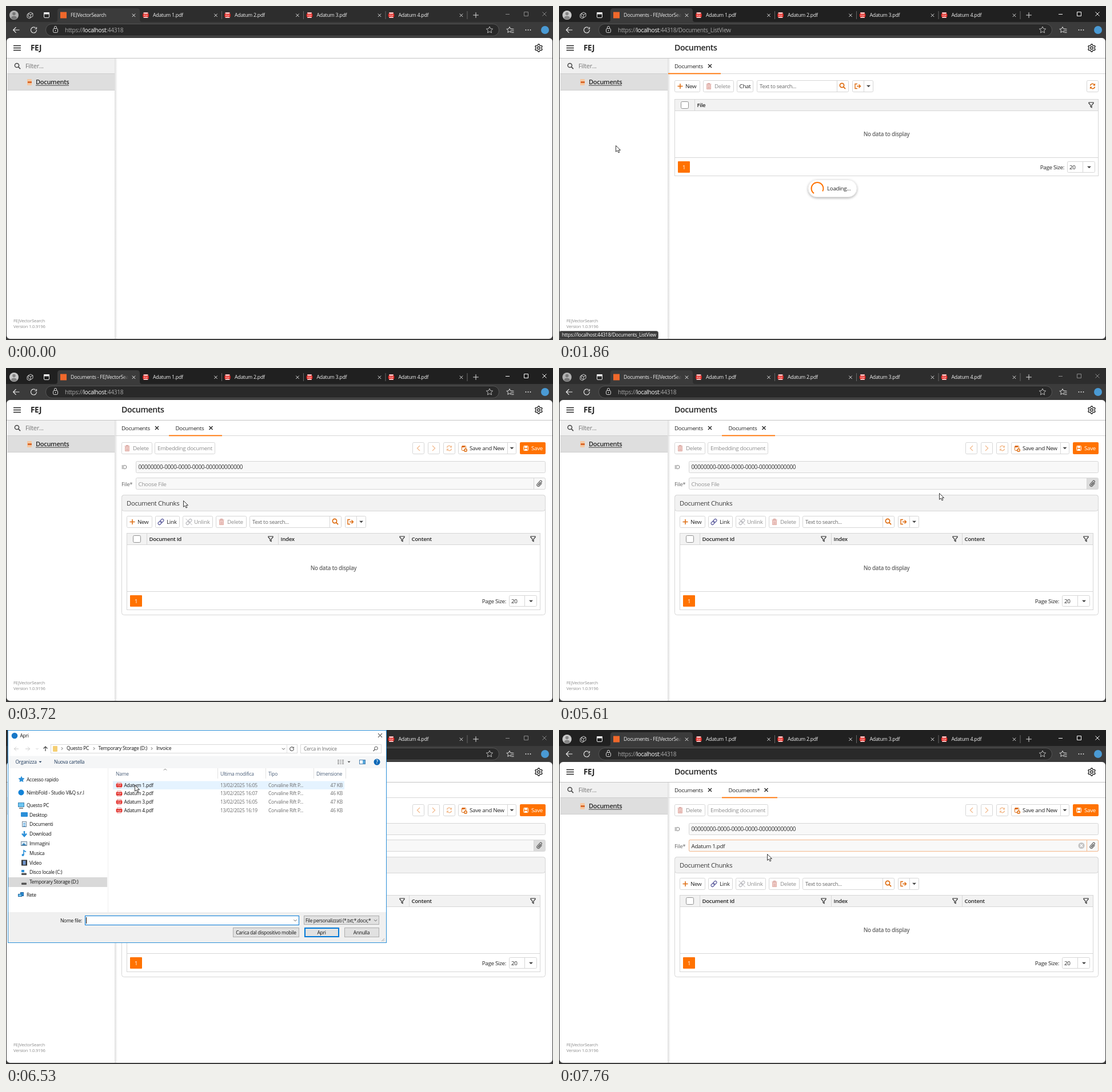
Recreate the animation shown at these times as an HTML page. Size 957x585 px, loop 8 s.

```html
<!DOCTYPE html>
<html lang="en">
<head>
<meta charset="utf-8">
<title>Document upload</title>
<style>
html, body { margin: 0; width: 100%; height: 100%; overflow: hidden; background: #3b3b3b; }
svg { display: block; }
text { font-family: "Open Sans", "Noto Sans", sans-serif; letter-spacing: -.03em; white-space: pre; }
.b { font-weight: 600; }
.brand { font-weight: 700; font-stretch: 75%; }
.end { text-anchor: end; }
.mid { text-anchor: middle; }
</style>
</head>
<body>
<svg id="stage" width="957" height="585" viewBox="0 0 957 585"></svg>
<script>
const ORANGE = '#ff7200', RUST = '#dd6a0c', INK = '#242424', LINE = '#d6d6d6', PALE = '#f2f2f2', OFF = '#8c8c8c', FADED = '#f3bd92';

// Drawing helpers
const T = (x, y, s, size = 9.8, fill = INK, cls = '') =>
  `<text x="${x}" y="${y}" font-size="${size}" fill="${fill}" class="${cls}">${s}</text>`;
const R = (x, y, w, h, fill = '#fff', rx = 0) =>
  `<rect x="${x}" y="${y}" width="${w}" height="${h}" fill="${fill}" rx="${rx}"/>`;
const box = (x, y, w, h, fill = '#fff', line = LINE, rx = 2) =>
  `<rect x="${x + .5}" y="${y + .5}" width="${w - 1}" height="${h - 1}" fill="${fill}" stroke="${line}" rx="${rx}"/>`;
const P = (d, c = INK, w = 1, fill = 'none') => `<path d="${d}" stroke="${c}" stroke-width="${w}" fill="${fill}"/>`;
const C = (x, y, r, fill, line = 'none', w = 1) =>
  `<circle cx="${x}" cy="${y}" r="${r}" fill="${fill}" stroke="${line}" stroke-width="${w}"/>`;
const G = (id, ...parts) => `<g id="${id}">${parts.join('')}</g>`;
const at = (x, y, s) => `<g transform="translate(${x} ${y})">${s}</g>`;

// Icons, centred on x, y
const plus = (x, y, c = RUST, r = 4.5, w = 1.5) => P(`M${x - r} ${y}h${2 * r}M${x} ${y - r}v${2 * r}`, c, w);
const cross = (x, y, r = 3, c = INK, w = 1.4) =>
  P(`M${x - r} ${y - r}l${2 * r} ${2 * r}m0 ${-2 * r}l${-2 * r} ${2 * r}`, c, w);
const caret = (x, y, c = '#444', r = 3.5) => P(`M${x - r} ${y - r / 2}h${2 * r}l${-r} ${r}z`, 'none', 0, c);
const chevron = (x, y, dx, dy, c, w = 1) => P(dx
  ? `M${x - dx} ${y - dy}l${2 * dx} ${dy}l${-2 * dx} ${dy}` : `M${x - dy} ${y - dy / 2}l${dy} ${dy}l${dy} ${-dy}`, c, w);
const glass = (x, y, c, w = 1.7, r = 3.6) => C(x - 1, y - 1, r, 'none', c, w) + P(`M${x + r - 2} ${y + r - 2}l3.5 3.5`, c, w);
const funnel = (x, y) => P(`M${x - 4} ${y - 4}h8v1.5l-3 3.2v4l-2 -1.2v-2.8l-3 -3.2z`, INK, 1.1);
const trash = (x, y) => P(`M${x - 4.5} ${y - 3.5}h9m-6 0v-1.5h3v1.5`, '#d59a93', 1.2) +
  P(`M${x - 3.5} ${y - 2}h7v7h-7z`, '#e0aaa3', 1, '#f3d5d0') + P(`M${x - 1} ${y}v4m2.2 0v-4`, '#cf8f88', .8);
const reload = (x, y, c, r = 4, w = 1.5) => at(x, y,
  P(`M${-r} -1A${r} ${r} 0 0 1 ${r - .5} -2M${r} 1A${r} ${r} 0 0 1 ${.5 - r} 2`, c, w) +
  P(`M${r + .6} -5v4h-4zM${-r - .6} 5v-4h4z`, 'none', 0, c));
const spinArrow = (x, y, r, c) => at(x, y, P(`M${r} 0A${r} ${r} 0 1 1 ${r * .65} ${-r * .75}`, c, 1.1) + P(`M${r} ${-r}v${r * .6}h${-r * .6}`, c, 1.1));
const exporter = (x, y) => P(`M${x - 1} ${y - 4}h-4v8h4M${x - 2} ${y}h6m-2.5 -3l3 3l-3 3`, RUST, 1.4);
const star = (x, y, r, c, fill = 'none') => P([...Array(10)].map((_, i) => {
  const a = Math.PI * (i / 5 - .5), q = i % 2 ? r * .48 : r;
  return (i ? 'L' : 'M') + (x + q * Math.cos(a)).toFixed(1) + ' ' + (y + q * Math.sin(a)).toFixed(1);
}).join('') + 'z', c, 1, fill);
const gear = (x, y) => P([...Array(24)].map((_, i) => {
  const a = Math.PI * (i - .5) / 12, r = i % 4 < 2 ? 6.6 : 4.9;
  return (i ? 'L' : 'M') + (x + r * Math.sin(a)).toFixed(1) + ' ' + (y - r * Math.cos(a)).toFixed(1);
}).join('') + 'z', INK, 1.4) + C(x, y, 2.2, 'none', INK, 1.4);
const pdf = (x, y) => R(x - 4, y - 5, 8, 10, '#fff', 1) + P(`M${x - 3.5} ${y - 4.5}h7v9h-7z`, '#d44', .6) +
  R(x - 5.3, y - 2.6, 10.6, 5.6, '#e0201b', 1) + T(x, y + 1.7, 'PDF', 4.2, '#fff', 'b mid');
const link = (x, y, c) => at(x, y, `<g transform="rotate(-45)" fill="none" stroke="${c}" stroke-width="1.1"><rect x="-6" y="-2.3" width="7" height="4.6" rx="2.3"/><rect x="-1" y="-2.3" width="7" height="4.6" rx="2.3"/></g>`);
const clip = (x, y) => at(x, y, `<g transform="rotate(42)">${P('M2.6 -3v6a2.6 2.6 0 0 1 -5.2 0v-7a1.8 1.8 0 0 1 3.6 0v6.5a.8 .8 0 0 1 -1.6 0v-5.5', '#444', 1)}</g>`);

// Web page controls
const button = (x, y, w, label, icon = '', c = INK, tx = x + 20) => box(x, y, w, 21) + icon + T(tx, y + 14, label, 9.8, c);
const search = (x, y) => box(x, y, 161, 21) + P(`M${x + 140.5} ${y}v21`, LINE) + T(x + 5, y + 14, 'Text to search...', 9.5, '#666') + glass(x + 150, y + 10, RUST);
const exports = (x, y) => box(x, y, 37, 21) + P(`M${x + 20.5} ${y}v21`, LINE) + exporter(x + 10, y + 10.5) + caret(x + 28.5, y + 10.5);
const newButton = (x, y) => button(x, y, 45, 'New', plus(x + 10, y + 10.5), INK, x + 19);
const deleteButton = (x, y) => button(x, y, 54, 'Delete', trash(x + 10, y + 10.5), OFF);
const grid = (x, y, w, cols) => {
  const r = x + w;
  return box(x, y, w, 135, '#fff', LINE, 0) + box(x, y, w, 21, PALE, LINE, 0) + box(x + 11, y + 4, 14, 13, '#fff', '#909090') +
    cols.map(([cx, name, fx]) => P(`M${cx + .5} ${y}v20`, LINE) + T(cx + 4.5, y + 14, name, 9.6, INK, 'b') + funnel(fx, y + 10)).join('') +
    T(573, y + 65, 'No data to display', 9.8, '#666', 'b mid') + P(`M${x} ${y + 102.5}h${w}`, LINE) +
    R(x + 6, y + 109, 21, 20, ORANGE, 1) + T(x + 16.5, y + 122.5, '1', 9.5, '#fff', 'mid') +
    T(r - 60, y + 122.5, 'Page Size:', 9.8, INK, 'end') + box(r - 55, y + 109, 49, 20) + P(`M${r - 27.5} ${y + 109}v20`, LINE) +
    T(r - 51, y + 122.5, '20') + caret(r - 16.5, y + 119.5);
};

// Browser window
const browser = () => {
  const tabs = [257, 400, 543.5, 686.5].map((x, i) => pdf(x - 12.5, 16) + T(x, 19, `Adatum ${i + 1}.pdf`, 8.8, '#f0f0f0') +
    cross(x + 110, 16.3, 2.7, '#ddd', 1) + P(`M${x + 120.5} 9v14`, '#666')).join('');
  return R(0, 0, 957, 585, '#3b3b3b') + '<rect id="strip" width="957" height="28"/>' +
    P('M86 28q4 0 4 -4v-15q0 -5 5 -5h134q5 0 5 5v15q0 4 4 4z', 'none', 0, '#3b3b3b') +
    G('person', C(14, 16, 8, '#c9c9c9'), C(14, 13.5, 2.8, '#858585'), P('M9 21.5q0 -4 5 -4t5 4q-5 4 -10 0z', 'none', 0, '#858585')) +
    P('M39 13l4 -2l4 2v5l-4 2.5l-4 -2.5zM39 13l-2 2v5l4 2l2 -1.5M39 13l4 2.3l4 -2.3M43 15.3v5', '#ddd', .9) +
    box(66, 11, 10, 10, 'none', '#f0f0f0', 1.5) + R(66, 11, 10, 3.5, '#f0f0f0', 1) + R(95, 10.5, 11, 11, '#f0682b') +
    '<svg x="113" y="6" width="101" height="18"><text id="title" y="13" font-size="8.8" fill="#f0f0f0"/></svg>' +
    R(204, 8, 10, 16, 'url(#fade)') + cross(223.5, 16.3, 2.7, '#eee', 1) + tabs + plus(822, 16, '#ddd', 4.8, 1) +
    `<g id="controls">${P('M874 14.5h7M906.5 10.5h7v7h-7zM938.5 10.5l7 7m0 -7l-7 7', 'currentColor', 1)}</g>` +
    P('M23.5 42h-11m5 -4.8l-4.8 4.8l4.8 4.8', '#eee', 1.2) + spinArrow(48.5, 42, 5, '#eee') +
    '<rect x="69.5" y="31.5" width="793" height="21" rx="10.5" fill="#292929" stroke="#555"/>' +
    box(82, 39, 9, 8, 'none', '#ddd') + P('M84.5 39v-1.5q0 -2 2 -2t2 2v1.5M86.5 42v2', '#ddd') +
    '<text id="url" x="103" y="45.5" font-size="10.2" fill="#a8a8a8"/>' +
    star(846, 42, 6, '#bbb') + star(881, 42, 5.5, '#ddd') + R(884, 41, 5, 6, '#3b3b3b') + P('M884.5 40.5h4m-4 3h4m-4 3h4', '#ddd') +
    [909.5, 913.5, 917.5].map(x => C(x, 42, .9, '#eee')).join('') + C(943, 42, 7, '#4a9ad4');
};

const page = () => R(1, 56, 955, 527, '#fff', 6) + P('M1 91.5h955', '#c4c4c4') +
  P('M13 69.5h13m-13 4h13m-13 4h13', INK, 1.6) + T(43, 78, 'FEJ', 13.5, INK, 'brand') + gear(932, 73.5) +
  R(190, 92, 5, 491, 'url(#shade)') + R(2, 92, 188, 27, '#f0f0f0') + R(2, 119, 188, 29, '#dedede') +
  P('M2 118.5h188M2 147.5h188', '#cfcfcf') + P('M190.5 92v491', '#e2e2e2') + glass(20, 105, '#444', 1.5) + T(34, 109, 'Filter...', 11, '#777') +
  R(37, 128, 8, 11, '#f6c7a0', 1) + R(38, 132, 7, 3, '#d9692b') + T(52, 137, 'Documents', 11.1, INK, 'b') + P('M52 139h58', INK, .9) +
  T(13, 553.5, 'FEJVectorSearch', 7.8, '#8d8d8d') + T(13, 564, 'Version 1.0.9196', 7.7, '#8d8d8d');

const heading = () => G('heading', T(202, 78, 'Documents', 14.2, INK, 'b'), P('M191 118.5h765', LINE), T(202, 109, 'Documents'), cross(264, 105));

const list = () => G('list', R(191, 117.5, 92, 1.8, ORANGE), newButton(202, 130), G('newHover', box(202, 130, 45, 21, '#ff720018', '#f0b98c')),
  deleteButton(252, 130), button(311, 130, 29, 'Chat', '', INK, 315.5), search(346, 130), exports(513, 130),
  box(923, 130, 21, 21), reload(933.5, 140.5, RUST), grid(202, 163, 742, [[237, 'File', 931]]));

const detail = () => G('detail', `<rect id="tabLine" x="285" y="117.5" height="1.8" fill="${ORANGE}"/>`,
  G('clean', T(296.5, 109, 'Documents'), cross(358.5, 105)), G('dirty', T(296.5, 109, 'Documents*'), cross(362.5, 105)),
  deleteButton(202, 130), button(260, 130, 106, 'Embedding document', '', OFF, 265),
  [711, 738, 765].map(x => box(x, 130, 21, 21)).join(''), P('M724 136l-4.5 4.5l4.5 4.5M746 136l4.5 4.5l-4.5 4.5', FADED, 1.4), reload(775.5, 140.5, FADED),
  button(791, 130, 102, 'Save and New', box(797, 136, 8, 9, '#fff', RUST, 1) + R(798, 136, 5, 3, RUST) + C(804, 144, 3, RUST) + plus(804, 144, '#fff', 2, 1)),
  P('M877.5 130v21', LINE), caret(885, 140.5), R(899, 130, 45, 21, ORANGE, 2), box(905, 136, 9, 9, 'none', '#fff', 1), R(907, 137, 5, 3, '#fff'), R(907, 141.5, 5, 3, '#fff'),
  T(919, 144, 'Save', 9.8, '#fff'), T(202, 177, 'ID', 9.8, '#666'), box(227, 163, 717, 21, '#f8f8f8'), T(231.5, 176.5, '00000000-0000-0000-0000-000000000000', 9.9, '#333'),
  T(202, 206.5, 'File*', 9.8, '#666'), box(227, 192, 717, 21, '#f8f8f8'), G('clipHover', R(923, 193, 20, 19, '#dcdcdc')),
  P('M923.5 192v21', LINE), clip(933.5, 202.5), G('choose', T(231.5, 206.5, 'Choose File', 9.8, '#949494')),
  G('focus', box(227, 192, 717, 21, 'none', '#f5b78a')),
  G('chosen', T(231.5, 206.5, 'Adatum 1.pdf'), box(227, 192, 717, 21, 'none', '#f5b78a'), P('M923.5 192v21', '#f5b78a'), C(914, 202.5, 5.5, '#c4c4c4'), cross(914, 202.5, 2.2, '#fff', 1.3)),
  G('progress', R(227, 210.5, 717, 2.5, ORANGE)),
  box(202, 222, 742, 211, '#fff', LINE, 4), box(202, 222, 742, 29, PALE, LINE, 4), T(211, 241, 'Document Chunks', 11.3, '#3c3c3c'),
  newButton(211, 259), button(261, 259, 43, 'Link', link(271, 269.5, '#56569a')), button(309, 259, 53, 'Unlink', link(320, 269.5, '#b8b8bd') + P('M314.5 264l11 11', '#b8b8bd'), OFF),
  deleteButton(367, 259), search(426, 259), exports(593, 259),
  grid(211, 289, 724, [[246, 'Document Id', 463], [476, 'Index', 693], [705, 'Content', 922]]));

const loading = () => G('loading', '<rect x="436" y="304.5" width="85" height="30" rx="15" fill="#fff" stroke="#ddd" stroke-width=".5" filter="url(#soft)"/>',
  `<circle id="ring" cx="452" cy="319.5" r="10.5" fill="none" stroke="${ORANGE}" stroke-width="2" stroke-dasharray="48 18"/>`, T(469, 323, 'Loading...', 9.8));

const status = () => G('status', box(0, 569, 174, 15, '#3b3b3b', '#666', 3), T(5, 579, 'https://localhost:44318/Documents_ListView', 8.5, '#fff'));

// File picker
const picker = () => {
  const t = (x, y, s, c = '#111', cls) => T(x, y, s, 8.5, c, cls), blue = '#2a8fd8';
  const dates = ['16:05', '16:07', '16:05', '16:19'];
  const rows = dates.map((d, i) => {
    const y = 96.7 + 14.7 * i;
    return pdf(198, y) + t(206.5, y + 3, `Adatum ${i + 1}.pdf`) + t(375, y + 3, `13/02/2025 ${d}`, '#6d6d6d') +
      t(459, y + 3, 'Corvaline Rift P...', '#6d6d6d') + t(589, y + 3, (i % 2 ? 46 : 47) + ' KB', '#6d6d6d', 'end');
  }).join('');
  const disk = y => R(27, y, 9, 3.5, '#555', 1);
  const folders = ['Desktop', 'Documenti', 'Download', 'Immagini', 'Musica', 'Video', 'Disco locale (C:)', 'Temporary Storage (D:)']
    .map((s, i) => t(41, 151.5 + 16.8 * i, s)).join('');
  const icons = star(27, 86.5, 5, blue, blue) + C(26.5, 109.5, 5, '#1383d8') + box(21, 127, 11, 8, '#6cc5f2', '#3d86b5', 0) + P('M23 137h7', '#666', 1.5) +
    R(26, 144, 12, 8, blue, 1) + box(28, 160, 8, 10, '#eef5fb', '#789', 0) + P('M30 163.5h4m-4 2.5h4m-4 2.5h4', blue) +
    P('M32 177v8m-4 -3.5l4 4.5l4 -4.5', blue, 2.5) + box(26, 195, 11, 8, '#dcecf7', '#789', 0) + P('M27 202l4 -4l5 4z', 'none', 0, '#3b83b8') +
    P('M31 219v-8l4 2.5', blue, 1.6) + C(29.5, 219, 2, blue) + R(27, 227.5, 10, 10, '#333') + R(29.5, 229, 5, 7, '#7297cf') +
    disk(250.5) + R(27, 245, 5, 4, blue) + disk(267.5) + box(25, 284, 6, 7, blue, '#23639c', 0) + box(21, 287, 7, 5, '#6cc5f2', '#23639c', 0);
  return G('picker', box(3, 0, 663, 373, '#fff', blue, 0), C(15, 10, 5.3, '#1777c8'), t(24.5, 13, 'Apri'), cross(654.5, 9.5, 3.5, '#111', 1),
    P('M22 33h-8m4 -3.5l-3.5 3.5l3.5 3.5M34 33h8m-4 -3.5l3.5 3.5l-3.5 3.5', '#ccc'), chevron(54.5, 33, 0, 2, '#ccc'), P('M69 37v-8m-3.5 3.5l3.5 -3.5l3.5 3.5', '#444', 1.2),
    box(78, 25, 432, 16, '#fff', '#d9d9d9', 0), R(82, 28, 8, 10, '#f5cf74', 1), chevron(98, 32.5, 1, 2.2, '#555'), t(106, 35, 'Questo PC'), chevron(154, 32.5, 1, 2.2, '#555'),
    t(161.5, 35, 'Temporary Storage (D:)'), chevron(255, 32.5, 1, 2.2, '#555'), t(263, 35, 'Invoice'), chevron(485.5, 33, 0, 2.5, '#555'), P('M491.5 26v14', '#e2e2e2'), spinArrow(500, 33, 3.4, '#555'),
    box(515, 25, 142, 16, '#fff', '#d9d9d9', 0), t(521, 36, 'Cerca in Invoice', '#6d6d6d'), C(647.5, 32, 2.8, 'none', '#555'), P('M645.5 34l-3 3', '#555', 1.3),
    R(4, 45.5, 661, 21.5, '#f5f6f7'), t(16.5, 59, 'Organizza', '#1e395b'), caret(60, 56, '#1e395b', 2.5), t(84, 59, 'Nuova cartella', '#1e395b'),
    P('M580 53h3m1.5 0h2m1.5 0h3m-11 3h3m1.5 0h2m1.5 0h3m-11 3h3m1.5 0h2m1.5 0h3', '#555'), caret(600, 56, '#444', 2.5), box(618, 52, 11, 8, '#fff', '#4a7fae', 0), R(624, 53, 4, 6, '#5aa9dd'), C(649, 56, 5.5, '#0866b6'), t(649, 59, '?', '#fff', 'b mid'),
    G('headHover', R(180, 67, 190, 18, '#d9ebf9')), P('M276 70.5l2.5 -2.5l2.5 2.5', '#777'), [370, 454, 538, 594].map(x => P(`M${x}.5 67v18`, '#e2e2e2')).join(''),
    [[192, 'Name'], [375, 'Ultima modifica'], [459, 'Tipo'], [543, 'Dimensione']].map(([x, s]) => t(x, 79.5, s, '#4c607a')).join(''),
    G('rowHover', R(187, 89.5, 405, 14.5, '#e5f3ff')), rows, P('M178.5 67v252', '#f0f0f0'), R(4, 258, 173, 17, '#d9d9d9'),
    t(36, 90, 'Accesso rapido'), t(36, 112.5, 'NimbFold - Studio V&amp;Q s.r.l'), t(36, 134.5, 'Questo PC'), folders, t(36, 291.5, 'Rete'), icons,
    R(4, 319, 661, 53, '#f0f0f0'), t(133, 336.5, 'Nome file:', '#111', 'end'), box(138, 325, 375, 17, '#fff', '#0078d7', 0), P('M140.5 328v11', '#000'), chevron(506, 333.5, 0, 2.5, '#555'),
    box(521, 325, 132, 16, '#e1e1e1', '#adadad', 0), T(524, 336.5, 'File personalizzati (*.txt;*.docx;*', 8.2, '#111'), chevron(646.5, 333.5, 0, 2.5, '#555'),
    box(397, 346, 116, 17, '#e1e1e1', '#adadad', 0), t(455, 357.5, 'Carica dal dispositivo mobile', '#111', 'mid'),
    '<rect x="523" y="347" width="59" height="15" fill="#e1e1e1" stroke="#0078d7" stroke-width="2"/>', t(552, 357.5, 'Apri', '#111', 'mid'),
    box(592, 346, 61, 17, '#e1e1e1', '#adadad', 0), t(622, 357.5, 'Annulla', '#111', 'mid'), P('M657 370l5 -5m-2.5 5l2.5 -2.5', '#aaa'));
};

const stage = document.getElementById('stage');
stage.innerHTML = `<defs>
  <linearGradient id="fade"><stop stop-color="#3b3b3b" stop-opacity="0"/><stop offset="1" stop-color="#3b3b3b"/></linearGradient>
  <linearGradient id="shade"><stop stop-color="#000" stop-opacity=".13"/><stop offset="1" stop-color="#000" stop-opacity="0"/></linearGradient>
  <filter id="soft" x="-20%" y="-40%" width="140%" height="190%"><feDropShadow dx="0" dy="1.5" stdDeviation="2" flood-opacity=".35"/></filter>
</defs>` + browser() + page() + heading() + list() + detail() + loading() + status() + picker() +
  G('cursor', G('click', C(0, 1, 8, '#ffe11c')), P('M.5 .5v10.8l2.6 -2.3l1.9 4l1.9 -.9l-1.9 -3.7h3.5z', '#222', .9, '#fff'));

// Pointer stops: time, x, y
const stops = [[930, 26, 176], [1240, 77, 133], [1860, 99, 244], [2160, 97, 244], [2470, 182, 219], [2780, 215, 139], [3090, 220, 147],
  [3720, 310, 232], [4030, 329, 239], [4340, 457, 257], [4680, 807, 184], [4990, 934, 210], [5300, 938, 205], [5610, 665, 219],
  [5920, 516, 222], [6220, 262, 82], [6530, 225, 96], [6840, 228, 95], [7150, 271, 145], [7450, 364, 217]];

// Visible spans, start and end pairs
const spans = {
  cursor: [930, 8000], click: [1550, 1860, 3410, 3720, 5300, 5610, 6840, 7150], heading: [1860, 8000], list: [1860, 3720],
  newHover: [2780, 3720], detail: [3720, 8000], clean: [3720, 7150], dirty: [7150, 8000], choose: [3720, 7150], chosen: [7150, 8000],
  clipHover: [4990, 7150], focus: [5300, 5610], progress: [7150, 7760], loading: [1860, 2160, 3410, 3720], status: [1550, 2160],
  picker: [5920, 6840], headHover: [6220, 6530], rowHover: [6530, 6840]
};
const during = (t, s) => s.some((a, i) => i % 2 === 0 && t >= a && t < s[i + 1]);
const el = id => document.getElementById(id);
const set = (id, name, v) => el(id).setAttribute(name, v);

function draw(t) {
  for (const id in spans) el(id).style.display = during(t, spans[id]) ? '' : 'none';
  const stop = stops.filter(s => s[0] <= t).pop() || stops[0];
  set('cursor', 'transform', `translate(${stop[1]} ${stop[2]})`);
  const active = during(t, [1550, 5610, 7150, 8000]);
  set('strip', 'fill', active ? '#202020' : '#2d2d2d');
  set('controls', 'color', active ? '#fff' : '#8a8a8a');
  set('person', 'opacity', active ? 1 : .85);
  set('status', 'opacity', t < 1860 ? .6 : 1);
  set('ring', 'transform', `rotate(${t < 3000 ? 125 : 20} 452 319.5)`);
  set('tabLine', 'width', t < 7150 ? 93 : 97);
  el('title').textContent = (t < 1860 ? '' : 'Documents - ') + 'FEJVectorSearch';
  el('url').innerHTML = 'https://<tspan fill="#fff">localhost</tspan>:44318' + (during(t, [1860, 3410]) ? '/Documents_ListView' : '');
}

let start;
function tick(now) {
  start ??= now;
  draw((now - start) % 8000);
  requestAnimationFrame(tick);
}
draw(0);
requestAnimationFrame(tick);
</script>
</body>
</html>
```
